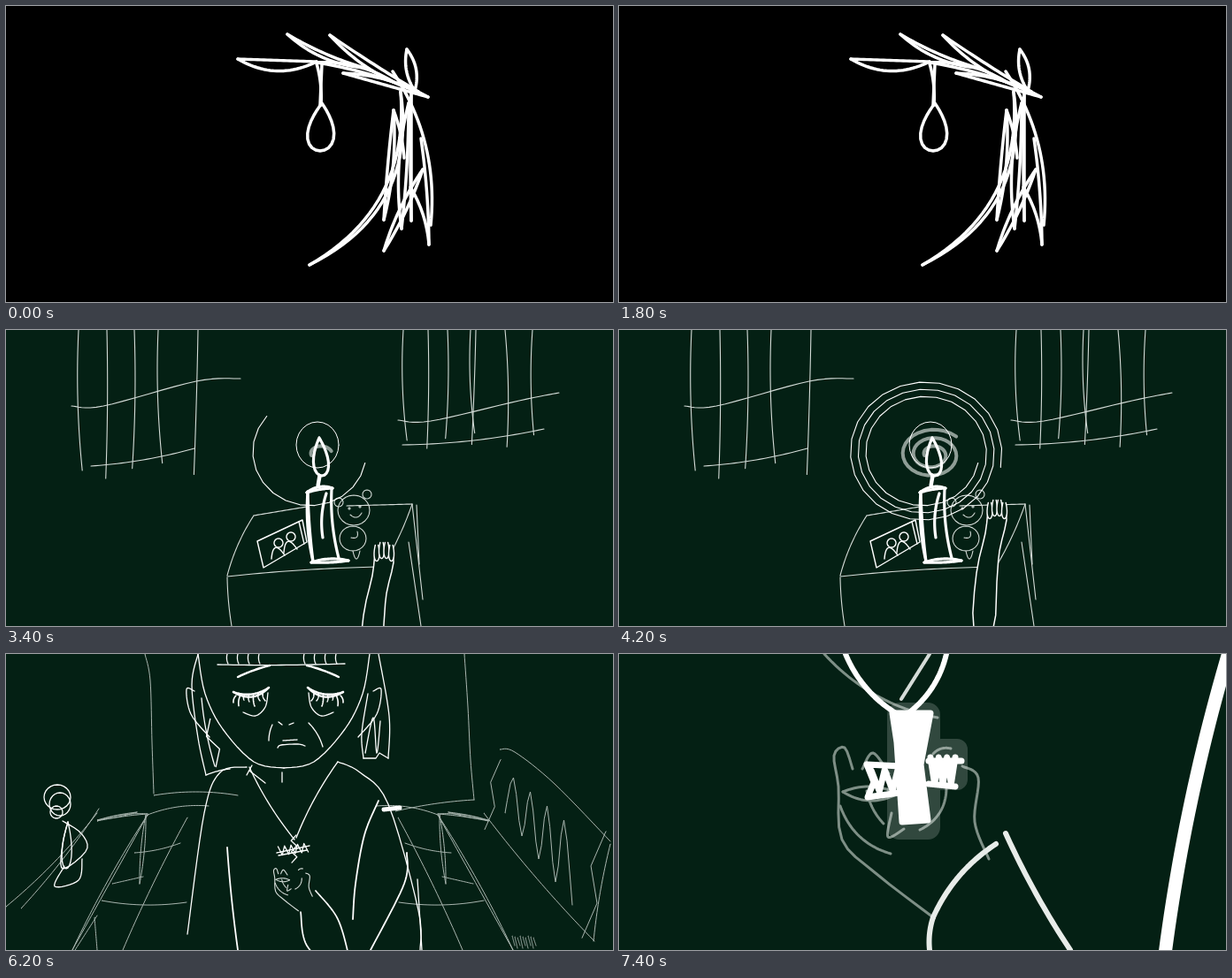
An HTML page with a canvas for the animation above (7600 ms loop, 686 by 335 pixels).

```html
<!DOCTYPE html>
<html lang="en">
<head>
<meta charset="utf-8">
<title>Candle</title>
<style>
html, body { margin: 0; width: 100%; height: 100%; overflow: hidden; background: #000; }
canvas { display: block; width: 100%; height: 100%; }
</style>
</head>
<body>
<canvas id="stage" width="686" height="335"></canvas>
<script>
const ctx = document.getElementById('stage').getContext('2d');
const LOOP = 7600, STEP = 200, SEGMENTS = 24;
const NIGHT = [4, 32, 20];
const WHITE = '#fff', CHALK = '#d5dcd8', FAINT = '#aab6b0', DIM = '#8f9d96';

const mix = (a, b, k) => a + (b - a) * k;
const clamp = k => Math.max(0, Math.min(1, k));
const progress = (t, from, to) => clamp((t - from) / (to - from));
const times = (n, make) => Array.from({ length: n }, (_, i) => make(i));
const sample = (make, n = SEGMENTS) => times(n + 1, i => make(i / n));

// Every stroke is a list of [x, y] points; a drawing is a list of strokes.
const path = (...xy) => times(xy.length / 2, i => [xy[2 * i], xy[2 * i + 1]]);

// Straight line bowed sideways by `bend` in the middle.
const arc = (x1, y1, x2, y2, bend = 0) => {
  const length = Math.hypot(x2 - x1, y2 - y1);
  return sample(u => {
    const bow = 4 * u * (1 - u) * bend / length;
    return [mix(x1, x2, u) - bow * (y2 - y1), mix(y1, y2, u) + bow * (x2 - x1)];
  });
};
const blade = (x1, y1, x2, y2, bendA, bendB) => [arc(x1, y1, x2, y2, bendA), arc(x1, y1, x2, y2, bendB)];

// Smooth (Catmull-Rom) curve through a few points.
const curve = (...xy) => {
  const pts = path(...xy), last = pts.length - 1;
  return sample(u => {
    const i = Math.min(last - 1, Math.floor(u * last)), k = u * last - i;
    const [a, b, c, d] = [-1, 0, 1, 2].map(n => pts[Math.max(0, Math.min(last, i + n))]);
    return [0, 1].map(n => b[n] + k / 2 * (c[n] - a[n] +
      k * (2 * a[n] - 5 * b[n] + 4 * c[n] - d[n] + k * (3 * (b[n] - c[n]) + d[n] - a[n]))));
  });
};

const spiral = (cx, cy, rx, ry, grow, turns, phase = 0) => sample(u => {
  const angle = phase + u * turns * 2 * Math.PI, size = mix(1, grow, u);
  return [cx + rx * size * Math.cos(angle), cy + ry * size * Math.sin(angle)];
}, SEGMENTS * Math.ceil(turns));
const ring = (cx, cy, rx, ry = rx) => spiral(cx, cy, rx, ry, 1, 1);

const drop = (x, y, width, height, lean) => sample(u => {
  const a = u * 2 * Math.PI, down = (1 - Math.cos(a)) / 2;
  return [x + lean * down - width * 0.65 * Math.sin(a) * Math.sin(a / 2), y + height * down];
});

const zigzag = (x1, y1, x2, y2, depth, n) => {
  const length = Math.hypot(x2 - x1, y2 - y1);
  return times(n + 1, i => {
    const u = i / n, side = (i % 2 ? depth : -depth) / length;
    return [mix(x1, x2, u) - side * (y2 - y1), mix(y1, y2, u) + side * (x2 - x1)];
  });
};

const mirror = (art, axis) => [...art, ...art.map(s => s.map(([x, y]) => [2 * axis - x, y]))];

// The tree is a bundle of thin blades: first the branch, then the trunk.
const tree = [
  ...blade(262, 60, 351, 63, 12, 0), ...blade(318, 32, 405, 70, 3, 8), ...blade(351, 64, 438, 86, -7, -2),
  ...blade(366, 33, 466, 97, 8, 1), ...blade(381, 76, 477, 103, -6, 0), ...blade(453, 49, 462, 96, -6, 5),
  ...blade(438, 118, 427, 242, -5, 1), ...blade(343, 293, 446, 97, 40, 35), ...blade(458, 95, 458, 243, 0, 1),
  ...blade(455, 110, 447, 252, -2, 7), ...blade(427, 277, 471, 185, -4, 3),
  arc(437, 74, 480, 248, -16), arc(438, 118, 450, 172, -2), arc(457, 205, 478, 270, -4), arc(478, 270, 469, 150, 2)
];
const noose = [arc(351, 65, 356, 112, -2), arc(357, 66, 355, 112), drop(357, 110, 30, 54, -2)];

const bentCandle = [
  arc(353, 78, 437, 97, -22), arc(347, 187, 364, 178, -3), arc(367, 177, 380, 186, -4),
  curve(347, 186, 352, 242, 385, 271, 428, 240), curve(379, 186, 377, 225, 400, 252, 433, 232),
  curve(383, 240, 405, 262, 437, 225, 458, 157), curve(458, 157, 447, 207, 428, 242, 390, 252), arc(377, 215, 380, 248, 1)
];
const bentFlame = [arc(367, 180, 364, 173), arc(370, 181, 365, 173), drop(374, 122, 21, 50, -9)];

const candle = [
  ...blade(340, 184, 369, 179, -4, -1), ...blade(341, 183, 347, 262, 1, 3), arc(368, 180, 376, 258, 3),
  arc(362, 185, 358, 235, 3), ...blade(345, 263, 387, 261, -3, 1)
];
const flame = [arc(354, 164, 352, 176), arc(355, 166, 353, 177), drop(354, 122, 17, 43, 3)];

// Window bars hang from the top edge; each one drifts a little.
const bars = (xs, bottom) => xs.map((x, i) =>
  arc(x, 0, x + 5 * Math.sin(i * 2.4 + 1), bottom + 9 * Math.sin(i * 1.7), 3 * Math.cos(i * 2)));
const windows = [
  ...bars([82, 114, 145, 172, 217], 159), curve(74, 86, 110, 86, 215, 58, 265, 55), arc(96, 154, 213, 134, 3),
  ...bars([449, 477, 499, 525, 531, 564, 595], 125), curve(443, 102, 480, 103, 580, 80, 625, 71), arc(448, 130, 608, 112, 4)
];

const table = [
  arc(250, 278, 280, 210, -3), arc(280, 210, 340, 200), arc(385, 199, 459, 197), arc(459, 197, 426, 268, -2),
  arc(250, 279, 426, 268, -2), arc(250, 280, 255, 335, 1), arc(459, 197, 471, 305), arc(464, 198, 467, 265), arc(455, 240, 469, 335)
];
const person = (x, y) => [ring(x, y, 5), arc(x - 8, y + 18, x + 7, y + 14, -11)];
const photo = [
  path(284, 239, 335, 215, 340, 240, 291, 269, 284, 239), arc(331, 217, 337, 242),
  ...person(308, 241), ...person(322, 234)
];
const doll = [
  ring(393, 204, 18, 17), ring(376, 195, 5), ring(408, 186, 5), arc(389, 209, 402, 207, 4),
  ring(388, 202, 1), ring(400, 200, 1), ring(392, 236, 15, 14), arc(397, 228, 390, 235, -4), arc(392, 250, 400, 250, 9)
];
const reach = curve(417, 203, 414, 230, 404, 275, 401, 337, 423, 337, 427, 285, 430, 250, 438, 215, 435, 200);
const reachFingers = times(4, i => drop(419 + 5.5 * i, 185 + 3 * Math.abs(i - 1.5), 6, 24, 0).slice(4, 21));
const halo = spiral(345, 139, 62, 58, 1.42, 3, 0.2);
const glow = spiral(354, 141, 9, 7, 4.2, 2.4, 3);

// One bed, seen twice on either side of the aisle.
const beds = mirror([
  ...blade(103, 188, 148, 179, 1, -1), ...blade(103, 189, 160, 181, -1, -3), ...blade(158, 182, 151, 260, 2, -2),
  ...blade(160, 182, 75, 335, 3, 0), arc(205, 185, 132, 335, 2), arc(160, 182, 229, 172, -4),
  arc(145, 225, 197, 214, 2), arc(108, 279, 204, 281, 4), arc(120, 260, 155, 252)
], 324);
const room = [
  curve(157, 0, 163, 30, 165, 100, 167, 158), arc(167, 160, 262, 160, -4),
  curve(518, 0, 522, 60, 525, 120, 529, 165), arc(440, 178, 529, 165, -2),
  arc(0, 286, 103, 180, 4), arc(17, 288, 105, 175, 3), arc(100, 298, 103, 335), arc(78, 335, 103, 296)
];
const headboard = [
  curve(558, 108, 575, 111, 620, 147, 683, 212), arc(540, 180, 665, 325, 3),
  zigzag(555, 119, 545, 199, 4, 3), zigzag(672, 200, 657, 322, 6, 3), arc(683, 215, 664, 325, 2),
  curve(...times(9, i => [564 + 9.5 * i, 180 + 13 * i - (i % 2 ? 48 + 5 * i : 0)]).flat())
];
const rug = times(9, i => arc(572 + i * 3, 319 + i % 3, 575 + i * 3, 330 + i % 2 * 3));
const toy = [
  ring(58, 162, 15, 14), ring(61, 170, 12, 13), ring(57, 179, 7),
  curve(64, 189, 85, 203, 91, 222, 64, 243, 64, 215, 70, 190), drop(70, 190, 11, 53, -2),
  curve(66, 240, 55, 263, 82, 256, 86, 232)
];

const hair = [
  curve(217, 0, 210, 35, 217, 95, 226, 137), arc(226, 137, 253, 130, -1), arc(221, 50, 236, 127, 2),
  zigzag(226, 75, 242, 126, 5, 3), curve(421, 0, 433, 70, 432, 118), path(432, 118, 422, 112, 418, 118, 404, 118),
  curve(404, 118, 402, 90, 409, 45), curve(406, 112, 415, 72, 419, 112, 423, 76),
  arc(239, 12, 383, 11, 1), ...[250, 337].flatMap(x => times(4, i => arc(x + 12 * i, 0, x + 12 * i + 1, 11, 1)))
];
const face = [
  ...mirror([curve(217, 0, 225, 45, 245, 85, 280, 122, 314, 129), curve(213, 42, 204, 40, 209, 68, 230, 94)], 314),
  ...mirror([curve(268, 66, 282, 70, 293, 60, 296, 44)], 319),
  arc(308, 77, 312, 80), arc(320, 80, 325, 78), arc(301, 80, 297, 98, 1), arc(342, 78, 358, 105, -2)
];
const lids = mirror([...blade(257, 43, 297, 38, 8, 5), arc(262, 26, 298, 13, -1)], 319);
const lashes = mirror(times(7, i => arc(260 + 5 * i, 47 - i * 0.5, 257 + 6 * i, 55 + 4 * Math.sin(i * 2), 1)), 319);
const body = [
  curve(272, 128, 242, 134, 224, 180, 205, 317), curve(375, 122, 400, 134, 432, 170, 466, 290, 468, 335), arc(465, 255, 470, 335)
];

const knuckles = curve(267, 180, 280, 120, 318, 95, 352, 108, 382, 160, 377, 175);
const palms = [...knuckles, ...path(387, 187, 330, 207, 309, 195, 269, 182)];
const sleeves = [
  curve(270, 184, 248, 258, 236, 284, 255, 290, 298, 235, 310, 195),
  curve(338, 200, 355, 265, 395, 320, 418, 295, 385, 225, 368, 192)
];
const fingers = [
  zigzag(322, 98, 325, 141, 5, 6), arc(322, 140, 314, 190, 1), curve(324, 140, 322, 165, 327, 185, 337, 190),
  arc(311, 188, 318, 150), arc(300, 101, 336, 104, -5), arc(268, 165, 279, 125, 2), arc(377, 175, 388, 187),
  curve(365, 192, 405, 280, 413, 297, 370, 280, 338, 200), arc(252, 304, 300, 236, 8), drop(327, 204, 11, 35, 0), arc(306, 219, 338, 213)
];
const cuffs = [arc(269, 182, 309, 195), ...blade(307, 219, 368, 191, 0, -2), arc(316, 206, 368, 191)];
const hiddenMouth = [...blade(307, 94, 337, 92, -5, 2), arc(311, 96, 335, 95)];
const bareMouth = [curve(307, 106, 311, 103, 330, 102, 338, 104), arc(313, 98, 329, 97)];

const necklace = [arc(275, 128, 326, 210, 3), arc(375, 122, 328, 208, 3), arc(278, 126, 272, 137), arc(275, 132, 293, 146), arc(312, 134, 312, 145)];
const smallCross = [zigzag(308, 223, 341, 219, 5, 9), zigzag(325, 205, 326, 236, 3, 5), arc(306, 225, 343, 217), arc(308, 228, 340, 222)];
const forearm = [curve(333, 262, 340, 300, 375, 334), curve(350, 238, 375, 270, 389, 318)];
const sides = [curve(421, 166, 405, 205, 395, 260, 392, 300), curve(453, 225, 450, 260, 412, 335), arc(250, 219, 262, 335, 1)];

// The fist is drawn at close-up size; the wide view shows it at a quarter.
const fist = [
  curve(264, 130, 255, 106, 243, 115, 248, 150, 252, 210, 290, 248, 355, 298), arc(250, 172, 307, 226, 10),
  ...blade(253, 156, 315, 158, 9, -7), curve(275, 130, 287, 112, 305, 135), arc(280, 155, 299, 192, 3),
  curve(308, 180, 304, 207, 322, 198), arc(355, 113, 375, 107, -3), arc(340, 199, 370, 150, 9),
  curve(388, 127, 406, 140, 402, 190, 418, 232)
];
const wrist = [arc(426, 215, 355, 298, 8), arc(355, 298, 351, 335, 2), arc(437, 203, 510, 335, 3)];

function pen(art, width, color = WHITE, fill) {
  ctx.lineWidth = width;
  ctx.strokeStyle = color;
  for (const stroke of art) {
    ctx.beginPath();
    stroke.forEach(p => ctx.lineTo(...p));
    if (fill) { ctx.fillStyle = fill; ctx.fill(); }
    if (width) ctx.stroke();
  }
}

function placed(x, y, scale, originX, originY, paint) {
  ctx.save();
  ctx.translate(x, y);
  ctx.scale(scale, scale);
  ctx.translate(-originX, -originY);
  paint();
  ctx.restore();
}

const morph = (from, to, k) => times(Math.max(from.length, to.length), i => {
  const target = to[i % to.length];
  return from[i % from.length].map(([x, y], n) => [mix(x, target[n][0], k), mix(y, target[n][1], k)]);
});

function drawTree(t) {
  const sway = 14 * Math.sin(Math.PI * progress(t, 0, 1200));
  placed(sway, 0, 1, 0, 0, () => pen([...tree, ...noose], 3.5));
}

function drawMorph(t) {
  const bend = progress(t, 1800, 2400), straighten = progress(t, 2400, 2800);
  const [wax, fire] = bend < 1
    ? [morph(tree, bentCandle, bend), morph(noose, bentFlame, bend)]
    : [straighten ? morph(bentCandle, candle, straighten) : bentCandle, morph(bentFlame, flame, straighten)];
  pen([...wax, ...fire], 3);
}

function drawTable(t, paper) {
  pen([...windows, ...table, ...doll], 1.1, CHALK);
  pen(photo, 1.4);
  placed(0, 60 * (1 - progress(t, 3200, 4200)), 1, 0, 0, () => {
    pen([reach], 1.5, WHITE, paper);
    pen(reachFingers, 1.4, WHITE, paper);
  });
  const lit = progress(t, 3200, 4200);
  const grown = stroke => [stroke.slice(0, Math.ceil(stroke.length * lit))];
  pen(grown(halo), 1.1);
  pen(grown(glow), 4, DIM);
  if (lit) pen([ring(352, 130, 24, 26)], 1);
  pen([...candle, ...flame], 3.2);
}

function drawPrayer(paper) {
  pen(sleeves, 1.5, WHITE, paper);
  pen([palms], 0, WHITE, paper);
  pen([knuckles, ...fingers], 1.3);
  pen(cuffs, 2.6);
}

function drawGirl(t, paper) {
  pen([...room, ...beds, ...headboard, ...rug], 1, FAINT);
  pen([...toy, ...hair, ...face, ...body], 1.3);
  pen(lids, 2.4);
  pen(lashes, 1.6);
  pen([arc(427, 176, 445, 174)], 5);
  if (t < 6200) {
    const away = 60 * (1 - progress(t, 4400, 5000)) + 110 * progress(t, 5600, 6200);
    placed(0, away, 1, 0, 0, () => drawPrayer(paper));
    pen(hiddenMouth, 1.6);
  } else {
    const low = 45 * (1 - progress(t, 6000, 6600));
    pen([...necklace, ...bareMouth, ...smallCross], 1.3);
    pen(sides, 1.8);
    placed(325, 220 + low, 0.25, 333, 135, () => pen(fist, 4.5, CHALK));
    placed(0, low, 1, 0, 0, () => pen(forearm, 1.7));
  }
}

function drawCross() {
  pen([...fist, arc(232, 0, 360, 72, 12)], 3, '#7e8f86');
  pen([arc(351, 0, 319, 51)], 4, CHALK);
  pen(wrist, 6, '#e8ece9');
  pen([arc(256, 0, 313, 67, 7), arc(370, 0, 327, 67, -7)], 6);
  pen([arc(690, -5, 617, 340, 7)], 15);
  ctx.fillStyle = 'rgba(255,255,255,.18)';
  ctx.beginPath();
  ctx.roundRect(303, 55, 60, 155, 14);
  ctx.roundRect(352, 96, 42, 58, 12);
  ctx.fill();
  pen([path(309, 67, 352, 67, 341, 125, 349, 188, 320, 190, 314, 100, 309, 67)], 7, WHITE, WHITE);
  pen([zigzag(286, 144, 316, 142, 12, 4), path(280, 125, 318, 127, 317, 157, 281, 162, 288, 145, 280, 125)], 7);
  pen([zigzag(352, 132, 380, 132, 15, 6), arc(350, 121, 387, 121), arc(350, 147, 380, 150)], 7);
}

function draw(t) {
  const dusk = progress(t, 1800, 2800);
  const paper = `rgb(${NIGHT.map(c => Math.round(c * dusk))})`;
  ctx.fillStyle = paper;
  ctx.fillRect(0, 0, 686, 335);
  ctx.lineCap = ctx.lineJoin = 'round';
  if (t <= 1800) drawTree(t);
  else if (t < 3000) drawMorph(t);
  else if (t < 4400) drawTable(t, paper);
  else if (t < 7000) drawGirl(t, paper);
  else if (t < 7400) {
    const zoom = 4 ** progress(t, 6800, 7400), k = (zoom - 1) / 3;
    placed(mix(325, 333, k), mix(220, 135, k), zoom, 325, 220, () => drawGirl(t, paper));
  } else drawCross();
}

const start = performance.now();
let shown = -1;
function tick() {
  const t = Math.floor(((performance.now() - start) % LOOP) / STEP) * STEP;
  if (t !== shown) draw(shown = t);
  requestAnimationFrame(tick);
}
tick();
</script>
</body>
</html>
```
